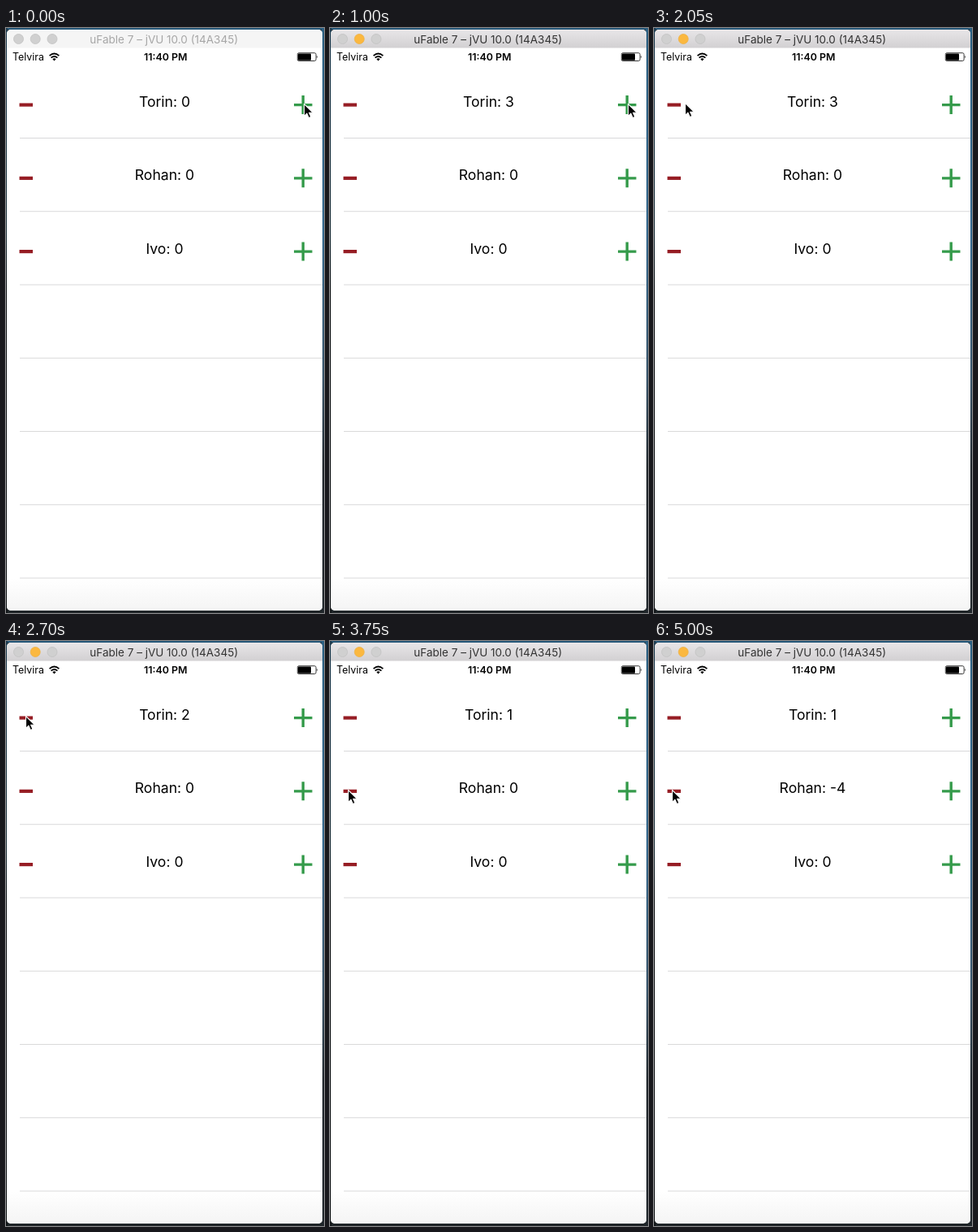
Write an HTML page that moves like this. It is 392 by 720 pixels and loops after 5050 ms.

```html
<!DOCTYPE html>
<html lang="en">
<head>
<meta charset="utf-8">
<title>Score counter</title>
<style>
  html, body { margin: 0; width: 100%; height: 100%; overflow: hidden; background: #20262b; }
  svg { display: block; width: 392px; height: 720px; font-family: Inter, Roboto, sans-serif; }
  text { text-anchor: middle; fill: #000; }
  .title { font-size: 13.5px; fill: #333; }
  .status { font-size: 12.4px; }
  .name { font-size: 17.6px; }
  .light { fill: #d0d0d0; stroke: #c2c2c2; stroke-width: .8; }
  .amber { fill: #fbb83f; stroke: #eeb044; }
  .bar { fill: url(#active); }
  .idle .bar { fill: #f5f5f5; }
  .idle .title { fill: #a6a6a6; }
  .idle .amber { fill: #d0d0d0; stroke: #c2c2c2; }
</style>
</head>
<body>
<svg id="stage" viewBox="0 0 392 720">
  <defs>
    <linearGradient id="active" x2="0" y2="1">
      <stop stop-color="#e8e6e8"/><stop offset="1" stop-color="#d2d0d2"/>
    </linearGradient>
    <linearGradient id="desk" x2="0" y2="1">
      <stop stop-color="#2a5f82"/><stop offset=".35" stop-color="#35698f"/>
      <stop offset=".6" stop-color="#38546a"/><stop offset=".75" stop-color="#20262b"/>
    </linearGradient>
    <linearGradient id="left" x2="0" y2="1">
      <stop stop-color="#1d3c50"/><stop offset=".35" stop-color="#22363f"/>
      <stop offset=".45" stop-color="#111517"/>
    </linearGradient>
    <linearGradient id="fade" x2="0" y2="1">
      <stop stop-color="#fff"/><stop offset="1" stop-color="#f4f4f4"/>
    </linearGradient>
    <clipPath id="frame"><rect x="1" y="2" width="389" height="715" rx="5"/></clipPath>
  </defs>

  <rect width="392" height="720" fill="#1e2427"/>
  <rect width="392" height="2" fill="#28597a"/>
  <rect width="2" height="720" fill="url(#left)"/>
  <rect x="389" width="3" height="720" fill="url(#desk)"/>

  <g clip-path="url(#frame)">
    <rect width="392" height="720" fill="#fff"/>
    <rect y="678" width="392" height="40" fill="url(#fade)"/>
    <rect class="bar" y="2" width="392" height="22.5"/>
  </g>
  <circle class="light" cx="15.5" cy="13.5" r="6"/>
  <circle class="light amber" cx="36.2" cy="13.5" r="6"/>
  <circle class="light" cx="57" cy="13.5" r="6"/>
  <text class="title" x="194.7" y="18.8">uFable 7 – jVU 10.0 (14A345)</text>

  <text class="status" x="27.5" y="40">Telvira</text>
  <g fill="none" stroke="#000" stroke-width="1.8">
    <path d="M53.6 34.2Q59.5 28.9 65.4 34.2M55.6 36.7Q59.5 33.2 63.4 36.7"/>
    <path d="M57.4 38.2Q59.5 36.4 61.6 38.2L59.5 40.4Z" fill="#000" stroke="none"/>
  </g>
  <text class="status" x="196.7" y="40" font-weight="600">11:40 PM</text>
  <rect x="359.3" y="30.7" width="22.8" height="9.8" rx="1.8" fill="none" stroke="#222" stroke-width=".9"/>
  <rect x="360" y="31.5" width="16" height="8.2" rx=".8"/>
  <path d="M383 33.8q1.5 1.8 0 3.7Z"/>

  <g id="table"></g>
  <path id="cursor" d="M.5 .5V15.4L3.9 12.2 6.3 17.6 8.9 16.4 6.6 11.2H11.2Z"
        stroke="#fff" stroke-width="1.1" stroke-linejoin="round"/>
</svg>

<script>
const LOOP = 5050, STEP = 50, PITCH = 90.25;
const FOCUS_AT = 200;

// Each click is [time, change].
const players = [
  { name: 'Torin', clicks: [[250, 1], [650, 1], [1000, 1], [2400, -1], [2750, -1]] },
  { name: 'Rohan', clicks: [[4100, -1], [4400, -1], [4650, -1], [4900, -1]] },
  { name: 'Ivo', clicks: [] }
];

// Pointer tip: [time, x, y].
const route = [
  [0, 367, 93], [1300, 367, 93], [1550, 274, 86], [1800, 125, 89],
  [2050, 38, 92], [2200, 24, 92], [3000, 24, 92], [3350, 22, 149],
  [3600, 22, 183], [LOOP, 22, 183]
];

const stage = document.getElementById('stage');
const table = document.getElementById('table');
const cursor = document.getElementById('cursor');

function add(tag, attributes) {
  const node = document.createElementNS('http://www.w3.org/2000/svg', tag);
  for (const key in attributes) node.setAttribute(key, attributes[key]);
  return table.appendChild(node);
}

for (let i = 0; i < 7; i++) {
  add('path', { d: `M17 ${135.5 + i * PITCH}H390`, stroke: '#d9d9da' });
}

players.forEach((player, i) => {
  const y = 94.6 + i * PITCH;
  add('path', { d: `M16.5 ${y}h16.5`, stroke: '#961d24', 'stroke-width': 4.2 });
  add('path', { d: `M355 ${y}h22.5M366.2 ${y - 11.5}v23`, stroke: '#359b4b', 'stroke-width': 3.4 });
  player.label = add('text', { class: 'name', x: 195.5, y: y + 2.4 });
});

function pointerAt(time) {
  const next = route.findIndex(point => point[0] > time);
  const [t0, x0, y0] = route[next - 1], [t1, x1, y1] = route[next];
  const part = (time - t0) / (t1 - t0);
  return [x0 + (x1 - x0) * part, y0 + (y1 - y0) * part];
}

function draw() {
  const time = Math.floor(performance.now() % LOOP / STEP) * STEP;
  stage.classList.toggle('idle', time < FOCUS_AT);
  for (const { name, clicks, label } of players) {
    const score = clicks.reduce((sum, [at, change]) => sum + (time >= at ? change : 0), 0);
    label.textContent = `${name}: ${score}`;
  }
  cursor.setAttribute('transform', `translate(${pointerAt(time)})`);
  requestAnimationFrame(draw);
}
draw();
</script>
</body>
</html>
```
